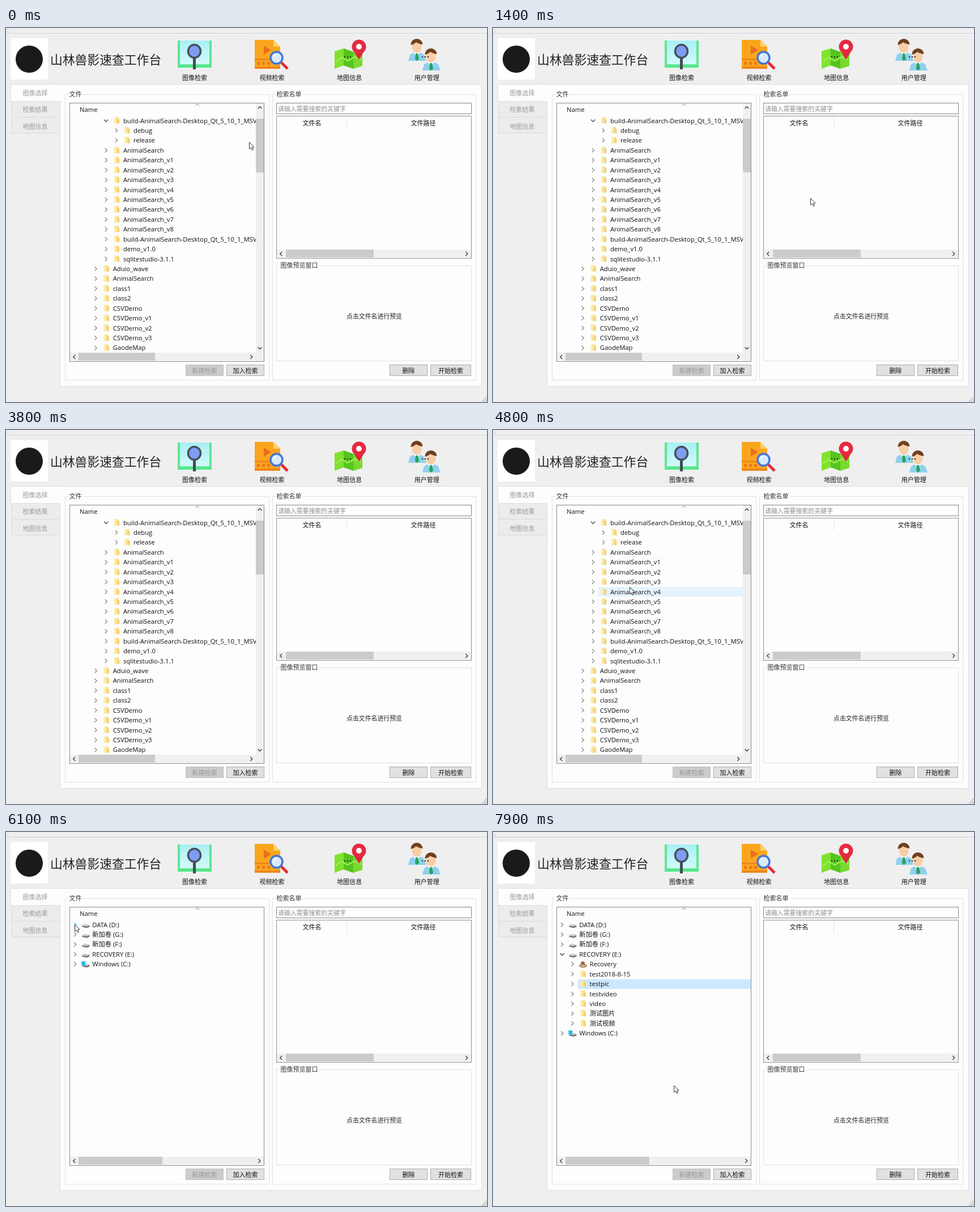
Write an HTML page with a canvas that moves like this. It is 849x660 px and loops after 8000 ms.

```html
<!DOCTYPE html>
<html lang="zh">
<head>
<meta charset="utf-8">
<title>文件检索</title>
<style>
html, body { margin: 0; width: 100%; height: 100%; overflow: hidden; background: #efefef; }
canvas { display: block; }
</style>
</head>
<body>
<canvas id="stage" width="849" height="660"></canvas>
<script>
const ctx = document.getElementById('stage').getContext('2d');
const LOOP = 8000, STEP = 100;
const FONT = '"Open Sans", "Noto Sans CJK SC", "Noto Sans CJK", sans-serif';
const CJK = '"Noto Sans CJK SC", "Noto Sans CJK", sans-serif';
const ROW = 17.43, TOP = 163.5, INDENT = 18.2;

// Shape helpers
function rect(x, y, w, h, fill, stroke) {
  if (fill) { ctx.fillStyle = fill; ctx.fillRect(x, y, w, h); }
  if (stroke) {
    ctx.strokeStyle = stroke; ctx.lineWidth = 1;
    ctx.strokeRect(x + .5, y + .5, w - 1, h - 1);
  }
}
function poly(points, fill) {
  ctx.beginPath();
  points.forEach(([x, y]) => ctx.lineTo(x, y));
  ctx.closePath();
  ctx.fillStyle = fill; ctx.fill();
}
function line(points, color, width = 1) {
  ctx.beginPath();
  points.forEach(([x, y], i) => i ? ctx.lineTo(x, y) : ctx.moveTo(x, y));
  ctx.strokeStyle = color; ctx.lineWidth = width; ctx.stroke();
}
function oval(x, y, rx, ry, fill, stroke, width = 1) {
  ctx.beginPath(); ctx.ellipse(x, y, rx, ry, 0, 0, Math.PI * 2);
  if (fill) { ctx.fillStyle = fill; ctx.fill(); }
  if (stroke) { ctx.strokeStyle = stroke; ctx.lineWidth = width; ctx.stroke(); }
}
function text(s, x, y, { size = 11, color = '#111', align = 'left', family = CJK, weight = 400 } = {}) {
  ctx.font = `${weight} ${size}px ${family}`;
  ctx.fillStyle = color; ctx.textAlign = align;
  ctx.fillText(s, x, y);
}
const ARROWS = { right: [1, 0], left: [-1, 0], down: [0, 1], up: [0, -1] };
function chevron(x, y, dir, color = '#404040', size = 3.5, width = 1.4) {
  const [dx, dy] = ARROWS[dir], h = size / 2;
  line([[x - dx * h - dy * size, y - dy * h - dx * size], [x + dx * h, y + dy * h],
        [x - dx * h + dy * size, y - dy * h + dx * size]], color, width);
}
function dots(x, y) {
  for (let i = 0; i < 3; i++) rect(x + i * 5, y, 2, 2, '#222');
}

// Toolbar
function imageIcon() {
  rect(303, 22, 60, 45, '#5ee693');
  const g = ctx.createLinearGradient(0, 24, 0, 64);
  g.addColorStop(0, '#a9f0f4'); g.addColorStop(1, '#d3fafa');
  rect(307, 22, 52, 42, g);
  poly([[303, 66], [363, 66], [363, 70], [337, 70], [333, 72], [329, 70], [303, 70]], '#55e78b');
  rect(330, 52, 5, 21, '#454b55');
  oval(332.5, 41, 11, 11.5, '#7d9df0', '#48505e', 3.5);
}
function videoIcon() {
  poly([[439, 21], [472, 21], [484, 33], [484, 72], [439, 72]], '#fba51e');
  poly([[472, 21], [484, 33], [472, 33]], '#ffd069');
  poly([[455, 31], [468, 39], [455, 47]], '#e9701b');
  rect(439, 54, 45, 3, '#ef861c');
  rect(439, 68, 45, 4, '#ef861c');
  for (let x = 443; x < 470; x += 9) rect(x, 60, 5, 5, '#e9781c');
  line([[486, 61], [497, 72]], '#e52b36', 5);
  oval(477.5, 52.5, 10.5, 10.5, '#d9eaff', '#4576d8', 3.5);
  line([[472, 50], [477, 46]], '#fff', 2);
}
function mapIcon() {
  poly([[580, 41], [596, 36], [596, 66], [580, 72]], '#7fe22f');
  poly([[596, 36], [613, 42], [613, 72], [596, 66]], '#55c41f');
  poly([[613, 42], [629, 37], [629, 67], [613, 72]], '#78da2d');
  line([[582, 60], [592, 52], [603, 58], [616, 51], [627, 57]], '#a5ed5d', 2);
  poly([[611.5, 37], [634.5, 37], [623, 56]], '#df263c');
  oval(623, 33, 12.5, 12.5, '#e52a40');
  oval(623, 33, 5, 5, '#fff');
  dots(597, 50);
}
function person(x, y) {
  poly([[x - 15, y + 30], [x - 12, y + 19], [x - 5, y + 15], [x + 5, y + 15],
        [x + 13, y + 19], [x + 17, y + 30]], '#8fd0ee');
  poly([[x - 6, y + 15], [x + 6, y + 15], [x, y + 23]], '#f6fbff');
  poly([[x - 2, y + 17], [x + 2, y + 17], [x + 4, y + 27], [x, y + 30], [x - 3, y + 27]], '#27a45c');
  oval(x, y + 5, 8.5, 11, '#f8cda7');
  ctx.beginPath();
  ctx.ellipse(x, y + 1, 10.5, 10, 0, Math.PI, Math.PI * 2);
  ctx.quadraticCurveTo(x + 3, y, x - 1, y - 3);
  ctx.quadraticCurveTo(x - 5, y + 1, x - 10.5, y + 2);
  ctx.fillStyle = '#70401f'; ctx.fill();
}
function toolbar() {
  rect(0, 9, 849, 1, '#c5cad4');
  rect(0, 10, 849, 1, '#fafafa');
  rect(3, 3, 1, 1, '#888'); rect(3, 6, 1, 1, '#888');
  rect(8, 18, 66, 73, '#fff');
  oval(41, 55, 24, 24, '#1a1a1a');
  text('山林兽影速查工作台', 78, 64, { size: 21.8, color: '#222' });
  imageIcon(); videoIcon(); mapIcon();
  person(725, 28); person(750, 45);
  dots(734, 50);
  ['图像检索', '视频检索', '地图信息', '用户管理'].forEach((s, i) =>
    text(s, 333 + i * 136.6, 92, { align: 'center', weight: 500 }));
}

// Window chrome
function group(x, y, w, h, title) {
  rect(x, y, w, h, null, '#dfe0e4');
  ctx.font = `11px ${CJK}`;
  rect(x + 6, y - 6, ctx.measureText(title).width + 4, 12, '#fdfdfd');
  text(title, x + 7.5, y + 4, { color: '#333' });
}
function button(x, w, label, disabled) {
  rect(x, 594, w, 20, disabled ? '#cccccc' : '#e1e1e1', disabled ? '#bfbfbf' : '#adadad');
  text(label, x + w / 2, 608.5, { align: 'center', color: disabled ? '#979797' : '#111' });
}
function hScroll(x, y, w, thumbX, thumbW) {
  rect(x, y, w, 14, '#f0f0f0');
  rect(thumbX, y, thumbW, 14, '#cbcbcb');
  chevron(x + 7.5, y + 7.5, 'left');
  chevron(x + w - 8, y + 7.5, 'right');
}
function chrome() {
  rect(0, 0, 849, 660, '#efefef');
  toolbar();
  rect(95, 99, 745, 534, '#fdfdfd', '#dcdde3');
  rect(10, 129, 86, 29, '#ececec', '#dadadd');
  rect(10, 157, 86, 29, '#ececec', '#dadadd');
  rect(8, 99, 88, 31, '#fdfdfd', '#dfdfe3');
  rect(95, 100, 2, 29, '#fdfdfd');
  ['图像选择', '检索结果', '地图信息'].forEach((s, i) =>
    text(s, 51.5, 118.5 + i * 29.5, { align: 'center', color: '#999' }));
  group(104, 117, 361, 505, '文件');
  group(470, 117, 360, 505, '检索名单');
  group(477, 419, 345, 169, '图像预览窗口');
  rect(477, 132, 345, 20, '#fff', '#858585');
  text('请输入需要搜索的关键字', 480, 146.5, { color: '#8c8c8c', size: 10.9 });
  rect(477, 155, 345, 252, '#fdfdfd', '#8b8f96');
  rect(601, 156, 1, 22, '#e2e2e2');
  text('文件名', 540, 171.5, { align: 'center' });
  text('文件路径', 736.5, 171.5, { align: 'center' });
  hScroll(478, 391, 343, 494, 155);
  text('点击文件名进行预览', 650, 512.5, { align: 'center', size: 10.9, color: '#222' });
  button(317, 67, '新建检索', true);
  button(389, 67, '加入检索');
  button(677, 67, '删除');
  button(749, 72, '开始检索');
  for (let i = 0; i < 3; i++)
    for (let j = 0; j <= i; j++) rect(846 - j * 3, 651 + i * 3, 2, 2, '#b8b8b8');
}

// Tree contents: [depth, label, open, icon]
const folder = depth => name => [depth, name];
const BUILD = 'build-AnimalSearch-Desktop_Qt_5_10_1_MSVC2015_64bit';
const series = (name, n) => [name, ...Array.from({ length: n }, (_, i) => `${name}_v${i + 1}`)];
const projectRows = [
  [0, 'DATA (D:)', true, 'drive'], [1, 'Qt_code', true], [2, 'panda_project', true],
  [3, BUILD, true], [4, 'debug'], [4, 'release'],
  ...[...series('AnimalSearch', 8), BUILD, 'demo_v1.0', 'sqlitestudio-3.1.1'].map(folder(3)),
  ...['Aduio_wave', 'AnimalSearch', 'class1', 'class2', ...series('CSVDemo', 3), 'GaodeMap'].map(folder(2))
];
const recoveryRows = [
  [1, 'Recovery', false, 'recovery'],
  ...['test2018-8-15', 'testpic', 'testvideo', 'video', '测试图片', '测试视频'].map(folder(1))
];
const driveRows = open => [
  [0, 'DATA (D:)', false, 'drive'], [0, '新加卷 (G:)', false, 'drive'], [0, '新加卷 (F:)', false, 'drive'],
  [0, 'RECOVERY (E:)', open, 'drive'], ...(open ? recoveryRows : []), [0, 'Windows (C:)', false, 'system']
];

function rowIcon(kind, x, y) {
  if (!kind) {
    rect(x - 4, y - 6, 8, 11, '#f9df8b');
    rect(x - 4, y - 6, 3, 11, '#fdeeb5');
    rect(x + 3, y - 3, 2, 8, '#eec65c');
    return;
  }
  poly([[x - 6, y + 2], [x - 2, y - 1], [x + 7, y + 1], [x + 7, y + 4], [x + 2, y + 6], [x - 6, y + 4]], '#77797c');
  poly([[x - 6, y + 2], [x - 2, y - 1], [x + 7, y + 1], [x + 2, y + 3]], '#cfd1d4');
  if (kind === 'system') rect(x - 7, y - 5, 7, 7, '#22bde8');
  if (kind === 'recovery') {
    oval(x, y - 1, 3.5, 4, '#a5673b');
    oval(x, y + 3, 6, 2.5, '#d7b48e', '#87592e');
  }
}

function tree(t, mouse) {
  const inProject = t < 6100;
  const scroll = t < 5100 ? 3 : 0;
  const rows = inProject ? projectRows.slice(scroll, scroll + 24) : driveRows(t >= 6900);
  const right = inProject ? 441 : 455;

  rect(112, 132, 344, 457, '#fdfdfd', '#858990');
  chevron(337.5, 135.5, 'up', '#777', 3.5, 1);
  text('Name', 130, 148, { size: 11.25, family: FONT });

  ctx.save();
  ctx.beginPath(); ctx.rect(113, 155, right - 113, 418); ctx.clip();
  rows.forEach(([depth, label, open, icon], i) => {
    const y = TOP + i * ROW, x = 122 + depth * INDENT;
    const over = t >= 4100 && mouse && Math.abs(mouse.y - y) < ROW / 2 && mouse.x < right && mouse.x > 112;
    const picked = t >= 7500 && label === 'testpic';
    const start = Math.round(x + 9.5);
    if (picked || (over && mouse.x > start))
      rect(start, Math.round(y - 8.5), right - start, 17, picked ? '#cce8ff' : '#e5f3ff');
    const hot = over && Math.abs(mouse.x - x) < 8;
    chevron(x, y, open ? 'down' : 'right', hot ? '#35c4ee' : open ? '#333' : '#888', 3.7, 1.3);
    rowIcon(icon, x + 18.3, y);
    text(label, x + 30.3, y + 4, { size: 11.25, family: FONT });
  });
  ctx.restore();

  if (inProject) {
    rect(441, 133, 14, 440, '#f0f0f0');
    rect(441, scroll ? 160 : 148, 14, 95, '#cbcbcb');
    chevron(448, 140.5, 'up');
    chevron(448, 565, 'down');
    rect(441, 573, 14, 15, '#f0f0f0');
  }
  hScroll(113, 573, right - 113, 128, inProject ? 135 : 148);
}

// Pointer paths: [time, x, y]; the pointer is off stage between them
const paths = [
  [[0, 429, 201], [500, 433, 209], [900, 440, 222], [1400, 560, 300], [1800, 720, 420], [2200, 848, 650]],
  [[2700, 520, 632], [3000, 650, 300], [3300, 778, 10]],
  [[4100, 420, 636], [4500, 300, 420], [4900, 230, 250], [5100, 210, 230], [5400, 174, 198],
   [5900, 121, 163], [6200, 121, 163], [6700, 119, 215], [7100, 119, 216], [7400, 186, 266],
   [7600, 190, 268], [7900, 319, 447], [8000, 319, 447]]
];
function pointerAt(t) {
  for (const path of paths) {
    for (let i = 1; i < path.length; i++) {
      const [t0, x0, y0] = path[i - 1], [t1, x1, y1] = path[i];
      if (t >= t0 && t < t1) {
        const u = (t - t0) / (t1 - t0), k = u * u * (3 - 2 * u);
        return { x: Math.round(x0 + (x1 - x0) * k), y: Math.round(y0 + (y1 - y0) * k) };
      }
    }
  }
  return null;
}
const arrowShape = [[0, 0], [0, 12], [3, 9.5], [5, 14], [7, 13], [5, 8.8], [8.5, 8.5]];
function pointer({ x, y }) {
  const shape = arrowShape.map(([a, b]) => [x + a + .5, y + b + .5]);
  poly(shape, '#fff');
  line([...shape, shape[0]], '#333', 1);
}

function draw(now) {
  const t = Math.floor((now % LOOP) / STEP) * STEP;
  const mouse = pointerAt(t);
  chrome();
  tree(t, mouse);
  if (mouse) pointer(mouse);
}
function tick() {
  draw(performance.now() - begin);
  requestAnimationFrame(tick);
}
const begin = performance.now();
tick();
</script>
</body>
</html>
```
